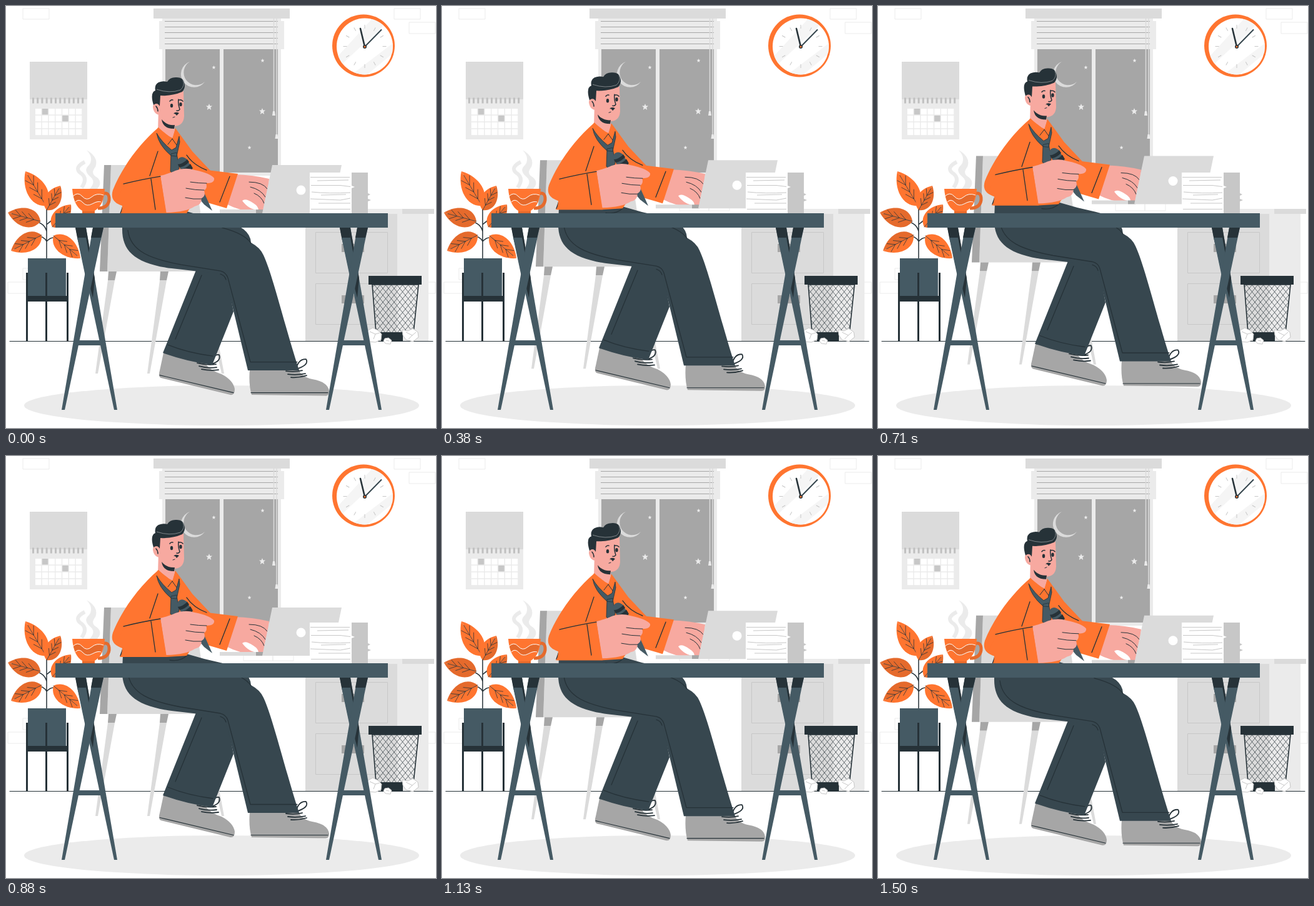
Write an HTML page that moves like this. It is 688 px wide and 674 px high and loops after 1.54 s.

```html
<!DOCTYPE html>
<html lang="en">
<head>
<meta charset="utf-8">
<title>Working late</title>
<style>
  html, body { margin: 0; width: 100%; height: 100%; overflow: hidden; background: #fff; }
  svg { display: block; width: 100%; height: 100%; }
  .line { fill: none; stroke: #263238; stroke-linecap: round; stroke-linejoin: round; }
  .ink { fill: #263238; }
  .slate { fill: #37474f; }
  .steel { fill: #455a64; }
  .orange { fill: #ff7530; }
  .rust { fill: #e56a2c; }
  .skin { fill: #f7a9a0; }
  .gray { fill: #a6a6a6; }
  .mid { fill: #c7c7c7; }
  .soft { fill: #dbdbdb; }
  .pale { fill: #ebebeb; }
  .white { fill: #fff; }
  .thin { fill: none; stroke: #c7c7c7; }
  .brick { fill: none; stroke: #ebebeb; }
</style>
</head>
<body>
<svg viewBox="0 0 688 674">
  <defs>
    <pattern id="mesh" width="9" height="11" patternUnits="userSpaceOnUse">
      <path d="M0 0L9 11M9 0L0 11" stroke="#263238" stroke-width=".7"/>
    </pattern>
    <clipPath id="face"><circle cx="574" cy="64.5" r="45"/></clipPath>
    <g id="trestle">
      <path class="steel" d="M111 354h17L178 645h-5Z"/>
      <path class="ink" d="M111 354h17l14 81-3 31-25-96Z"/>
      <path class="steel" d="M114 370l16 76 6-32-8-44Z"/>
      <path class="steel" d="M139 354h17L94 645h-5Z"/>
      <path class="ink" d="M139 354h17l-4 16h-16Z"/>
      <path class="steel" d="M114 534h44l2 8h-48Z"/>
    </g>
    <path id="star" d="M0-5L1.4-1.5 5-1.4 2.2 1 3.2 5 0 2.7-3.2 5-2.2 1-5-1.4-1.4-1.5Z" class="pale"/>
  </defs>

  <!-- Wall -->
  <path class="brick" d="M27 4h42v17H27ZM621 4h42v17h-42ZM645 26h42v18h-42ZM3 441h42v18H3ZM27 419h42v18H27ZM645 441h42v18h-42ZM380 309h47v18h-47ZM427 309h33v18h-33Z"/>
  <ellipse class="pale" cx="345" cy="638" rx="316" ry="32"/>
  <path class="line" d="M6 535.5H683"/>

  <!-- Window -->
  <path class="pale" d="M250 20h190v251H250Z"/>
  <path class="gray" d="M255 60h87v206h-87ZM348 60h87v206h-87Z"/>
  <path class="soft" d="M294 89A21 21 0 1 0 318 121A20.1 20.1 0 1 1 294 89Z"/>
  <use href="#star" x="325" y="161"/>
  <use href="#star" x="410" y="168"/>
  <use href="#star" transform="translate(332.5 98) scale(.6)"/>
  <use href="#star" transform="translate(410.5 87) scale(.6)"/>
  <use href="#star" transform="translate(389.5 226) scale(.6)"/>
  <path class="pale" d="M245 24h200v45H245Z"/>
  <path d="M254 24.5H435M254 33.5H435M254 42.5H435M254 51.5H435M254 60.5H435" stroke="#a6a6a6"/>
  <path d="M428.5 20V168M433 20V206" stroke="#dbdbdb" stroke-width="1.5"/>
  <path class="pale" d="M427 168h3l1 7h-5ZM431.5 205h3l1 7h-5Z"/>
  <path class="soft" d="M236 4h218v16H236Z"/>

  <!-- Calendar -->
  <path class="pale" d="M38 149h92v64H38Z"/>
  <path class="soft" d="M38 89h92v60H38Z"/>
  <path d="M42 151H128" stroke="#c0c0c0" stroke-width="9" stroke-dasharray="3 4.2"/>
  <g id="days"></g>

  <!-- Clock -->
  <circle class="orange" cx="572" cy="63.5" r="50"/>
  <path class="rust" d="M590 17A50 50 0 0 1 545 105Q580 116 606 93Q632 55 590 17Z"/>
  <circle class="white" cx="574" cy="64.5" r="45"/>
  <path clip-path="url(#face)" fill="#f5f5f5" d="M520 92L588 18 606 29 530 100ZM555 108L625 55 628 68 575 112Z"/>
  <g id="ticks" stroke="#c7c7c7"></g>
  <path class="line" d="M574 65L567 36" stroke-width="2.6"/>
  <path d="M574 65L601 37.5" stroke="#37474f" stroke-width="2"/>
  <circle class="ink" cx="574" cy="65" r="3"/>
  <circle class="orange" cx="574" cy="65" r="1.5"/>

  <!-- Cabinet -->
  <path class="pale" d="M579 324h55v8h-55ZM626 332h50v203h-50Z"/>
  <path class="soft" d="M634 324h51v8h-51ZM479 332h147v203H479Z"/>
  <path class="thin" d="M495.5 361.5h115v65h-115ZM495.5 443.5h115v65h-115Z"/>
  <path class="gray" d="M537 380h36v13h-36ZM537 462h36v13h-36Z"/>

  <!-- Plant -->
  <path class="line" d="M65 404V318M65 360Q62 347 45 343M65 349Q72 343 77 340M65 376Q60 366 46 367M65 376Q76 364 87 376" stroke-width="1.5"/>
  <g id="leaves"></g>
  <path class="steel" d="M35 403h61v61H35Z"/>
  <path class="ink" d="M32 426h3v37h62v-37h3v109h-3v-63H66v63h-3v-63H35v63h-3ZM63 426h3v38h-3Z"/>

  <!-- Wastebasket -->
  <path d="M586 445H660L652 522H592Z" fill="url(#mesh)" stroke="#263238" stroke-width="1.6"/>
  <path class="ink" d="M580 431h85v14h-85ZM600 521h35v15h-35Z"/>
  <g class="white" stroke="#c7c7c7">
    <path d="M579 518l8-4 8 4 6 6-1 9-9 4-10-1-3-9ZM634 517l9 2 8-4 8 6 1 8-9 7-11-3-5-7ZM606 531l6-1 5 4-2 6-8-1-3-4Z"/>
    <path d="M582 520l9 4-3 8M591 524l7-2M640 521l10 5 6-5M650 526l-6 6M608 534l5 1" fill="none"/>
  </g>

  <g id="worker">
    <!-- Chair -->
    <path class="soft" d="M168 254H300L325 424H162Z"/>
    <path class="gray" d="M157 254h11L162 424H150ZM164 424h13l-3 14h-11ZM247 424h13l-3 14h-11Z"/>
    <path class="soft" d="M163 438h11L147 587h-4ZM246 438h11L230 587h-4ZM310 438h11L349 587h-4Z"/>

    <!-- Shoes -->
    <path class="gray" d="M252 554L318 570Q326 582 345 588Q364 598 366 612Q366 622 359 621L248 594Q243 592 246 582Z"/>
    <path class="gray" d="M390 580H468Q472 592 490 596Q515 600 517 615Q517 623 511 622.5L393 621Q388 605 390 580Z"/>
    <path class="line" d="M246 589.5L364 617.5M392 617.5H515" stroke-width="1.1"/>
    <path class="line" d="M306 570q16 4 30 2M309 575q14 4 28 2M313 580q14 3 27 1M328 572q4-17 13-15q4 10-13 15M448 583q14 2 26-1M451 588q14 2 28-1M456 593q12 1 25-3M464 580q4-17 16-16q6 9-16 16" stroke-width="1.8"/>

    <!-- Trousers -->
    <path class="slate" d="M304 422L251 554Q290 568 330 573L364 488 350 415Z"/>
    <path class="slate" d="M187 330L289 328Q318 337 347 343Q391 353 392 378Q407 386 412 398C427 430 447 515 469 582H387L352 437Q349 428 335 427L265 419C205 411 185 390 186 354Z"/>
    <path class="line" d="M195 358C199 392 232 404 280 413L343 423Q352 425 355 434L391 568.5H466M343 428Q350 430 352 437M313 430L271 532M259 541Q291 554 331 559M346 354Q383 364 392 379M262 338Q278 341 289 331" stroke-width="1.3"/>

    <!-- Far arm -->
    <path class="skin" d="M365 269Q397 270 421 276L417 327H405Q381 331 350 315Z"/>
    <path class="line" d="M389 281Q411 281 418 292M391 289Q408 293 415 305M397 299Q409 304 413 315"/>
    <path class="white" d="M378 311Q383 306 396 315Q404 320 404 326Q388 325 378 311Z"/>
    <path class="orange" d="M280 238L322 262 371 268 353 323 312 311Z"/>

    <!-- Neck and shirt -->
    <path class="skin" d="M244 165H270V212Q250 217 243 200Z"/>
    <path class="orange" d="M244 194Q256 207 267 211L271 195Q285 214 298 232L331 267 289 331 257 333H182L187 319Q165 313 171 294C184 261 211 222 244 194Z"/>
    <path class="line" d="M243 232L230 271M358 272L342 313M187 319Q186 323 183 331M289 238Q300 254 321 262" stroke-width="1.3"/>
    <path class="orange" d="M243 194L266 212 265 232 240 205ZM271 196L266 212 274 229 279 212Z"/>
    <path class="line" d="M266 212L259 221M266 212L273 222"/>

    <!-- Tie -->
    <path class="steel" stroke="#263238" stroke-width=".8" d="M241 203Q249 217 265 230L272 226 277 208 278 217 273 240 264 239Q244 222 241 203ZM264 236L273 234 277 259 271 271 263 264Z"/>
    <path class="steel" d="M273 248Q279 236 290 245L313 289 330 327 317 317 295 291Z"/>
    <path class="ink" d="M275 253Q283 252 290 245L293 249Q287 256 278 258ZM280 261Q289 259 295 252L299 259Q292 266 284 267Z"/>

    <!-- Near arm -->
    <path class="skin" d="M247 271Q263 267 271 263Q286 257 302 262Q327 267 333 275Q334 283 320 283Q323 290 317 295Q320 303 313 307Q313 318 302 320Q289 329 256 330Z"/>
    <path class="line" d="M295 281Q309 283 321 283M288 291Q303 294 317 294M287 306Q300 309 313 308"/>
    <path class="orange" d="M190 283L247 271 257 333H185L186 319 176 312Z"/>
    <path class="line" d="M188 284Q216 277 247 272M232 276L239 325" stroke-width="1.3"/>

    <!-- Head -->
    <path class="skin" d="M246 142Q262 133 284 136L285 176Q284 192 268 192Q252 192 246 180Z"/>
    <path class="ink" d="M249 181Q257 191 270 190L269 196Q251 196 249 181Z"/>
    <path class="skin" d="M246 158Q235 151 235 162Q237 174 247 174Z"/>
    <path class="ink" d="M236 158Q230 138 239 135Q237 126 244 122Q251 119 258 121Q262 114 271 114Q283 113 285 122Q288 130 282 137Q266 144 247 143L246 160Q242 153 236 158Z"/>
    <path d="M241 133Q262 140 279 134Q287 127 283 118" fill="none" stroke="#fff" stroke-width=".4"/>
    <path class="line" d="M276 149Q275 157 278 165Q276 168 273 167M262 152Q264 149 267 150M277 150Q281 149 283 152M240 160Q243 163 243 168" stroke-width="1.5"/>
    <ellipse class="ink" cx="265" cy="159" rx="2.2" ry="3.2"/>
    <ellipse class="ink" cx="279.5" cy="157" rx="2.2" ry="3.2"/>
    <path class="ink" d="M268 172Q271 168 277 171L273 175Q271 171 268 172Z"/>
    <path class="line" d="M267 178L270 177"/>

    <!-- Laptop -->
    <path class="soft" d="M342 325h58v6h-58Z"/>
    <path class="gray" d="M400 325h12v6h-12Z"/>
    <path class="soft" d="M426 254H537L521 331H410Z"/>
    <circle class="white" cx="472" cy="294" r="7.5"/>
  </g>

  <!-- Papers -->
  <path class="white" d="M486 266h68v65h-68Z"/>
  <path class="thin" d="M487 273.5H550M498 279l50-1M488 286.5h47l16 2M489 297q28 3 62 1M487 308l48 2 16-3M500 315h51M488 324.5h63M504 302l40-1"/>
  <path class="mid" d="M553 266h26v33l4 2-4 2v5l5 2-5 2v19h-26v-40l5-2-5-2Z"/>

  <!-- Cup -->
  <path class="pale" d="M129 230Q149 242 143 257Q134 268 146 274Q155 282 146 292H134Q145 280 134 272Q123 262 133 254Q141 243 129 230Z"/>
  <path d="M126 249Q107 259 121 268Q131 276 121 290" fill="none" stroke="#ebebeb" stroke-width="6"/>
  <path d="M154 300Q166 296 165 310Q163 323 147 323" fill="none" stroke="#e56a2c" stroke-width="5"/>
  <path class="orange" d="M106 292H158Q157 318 142 327V331H122V327Q108 319 106 292Z"/>
  <path class="rust" d="M108 304Q115 296 122 304T137 305T156 302L152 314Q146 309 139 316T123 314T111 313Z"/>
  <path d="M107 304Q115 296 122 304T137 305T156 302M111 313Q117 307 123 314T138 316T152 313" fill="none" stroke="#fff"/>
  <path class="rust" d="M122 328h20v3h-20Z"/>

  <!-- Desk -->
  <use href="#trestle"/>
  <use href="#trestle" x="423"/>
  <path class="steel" d="M79 331h532v23H79Z"/>
</svg>
<script>
  const byId = id => document.getElementById(id);

  // Leaf from base to tip; shade counts its dark halves, and the veins lean towards the tip.
  function leaf(x, y, tipX, tipY, width, shade) {
    const length = Math.hypot(tipX - x, tipY - y);
    const angle = Math.atan2(tipY - y, tipX - x) * 180 / Math.PI;
    const half = w => `M0 0C${length * .15} ${w} ${length * .65} ${w} ${length} 0Z`;
    let veins = `M0 0H${length * .88}`;
    for (let k = .2; k < .7; k += .2)
      for (const side of [-1, 1])
        veins += `M${length * k} 0L${length * (k + .2)} ${side * width * .36}`;
    return `<g transform="translate(${x} ${y}) rotate(${angle})">
      <path class="${shade === 2 ? 'rust' : 'orange'}" d="${half(-width)}"/>
      <path class="${shade ? 'rust' : 'orange'}" d="${half(width)}"/>
      <path class="line" stroke-width=".7" d="${veins}"/></g>`;
  }

  byId('leaves').innerHTML = [
    [64, 319, 31, 264, 21, 0], [65, 326, 87, 287, 17, 1],
    [55, 344, 3, 330, 20, 2], [74, 353, 104, 317, 17, 1],
    [57, 366, 8, 391, 20, 1], [76, 367, 119, 403, 19, 0]
  ].map(args => leaf(...args)).join('');

  let days = '';
  for (let row = 0; row < 4; row++)
    for (let col = 0; col < 7; col++) {
      const marked = row === 0 && col === 1 || row === 1 && col === 4;
      days += `<rect x="${47 + col * 10.8}" y="${164 + row * 10.9}" width="9.4" height="9.4" class="${marked ? 'mid' : 'white'}"/>`;
    }
  byId('days').innerHTML = days;

  let ticks = '';
  for (let hour = 0; hour < 12; hour++)
    ticks += `<path d="M574 30v6" transform="rotate(${hour * 30} 574 64.5)"/>`;
  byId('ticks').innerHTML = ticks;

  // The worker, chair and laptop rise and sink at a constant speed.
  const PERIOD = 1540, TOP_TIME = 735, TOP = -15, SPEED = .0206;
  const worker = byId('worker');
  const start = performance.now();

  function draw(now) {
    const gap = Math.abs(Math.max(0, now - start) % PERIOD - TOP_TIME);
    const y = TOP + SPEED * Math.min(gap, PERIOD - gap);
    worker.setAttribute('transform', `translate(0 ${y.toFixed(2)})`);
    requestAnimationFrame(draw);
  }
  draw(start);
</script>
</body>
</html>
```
